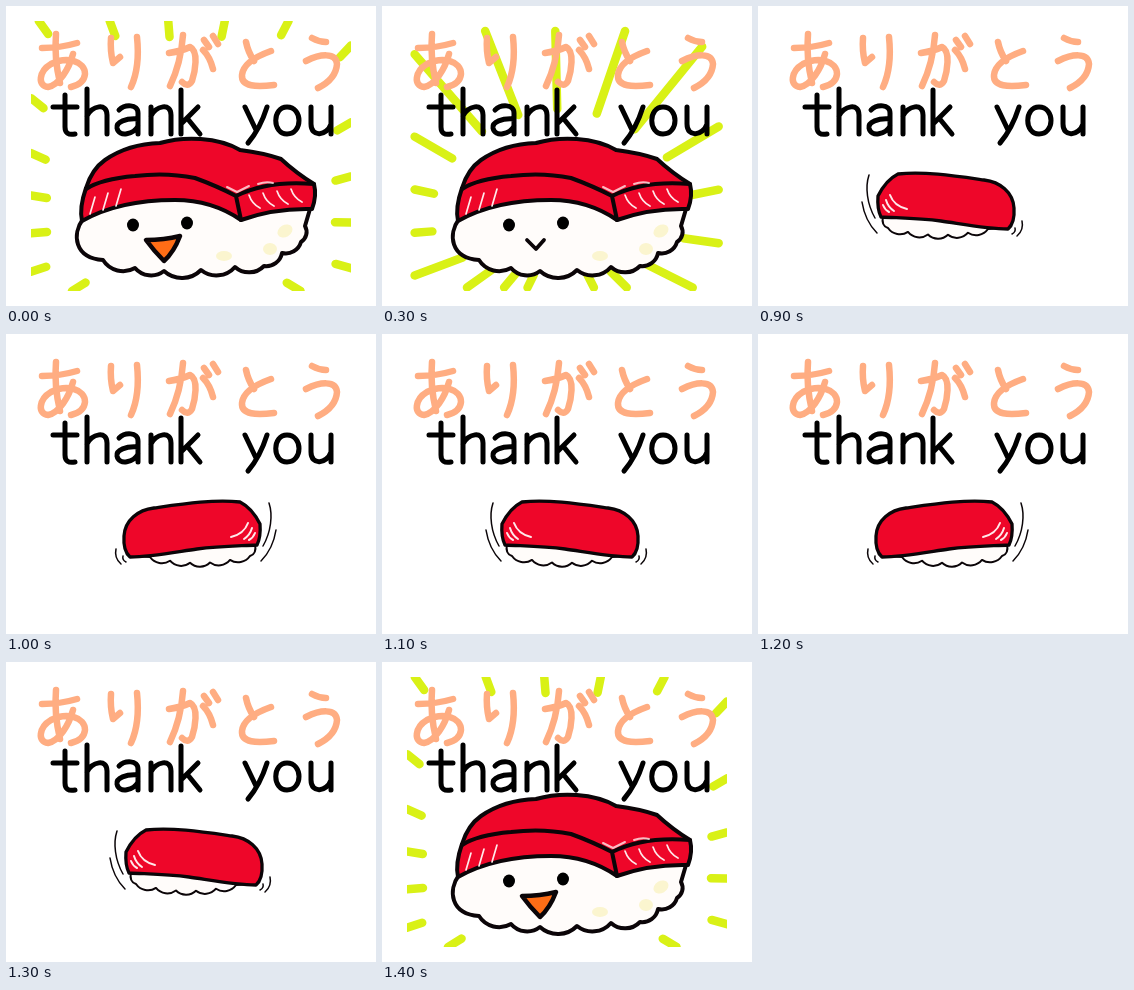
An HTML page that plays this animation: 370 by 300 pixels, repeating every 1500 ms.

```html
<!DOCTYPE html>
<html lang="ja">
<head>
<meta charset="utf-8">
<title>Thank you sushi</title>
<style>
  html, body { margin: 0; width: 100%; height: 100%; overflow: hidden; background: #fff; }
  svg { display: block; width: 370px; height: 300px; }
  path { stroke-linecap: round; stroke-linejoin: round; }
  .line, .shine, .rays, .word { fill: none; }
  .line, .ink { stroke: #0b0508; }
  .red { fill: #ee0629; }
  .rice { fill: #fffcfa; }
  .shine { stroke: #ffe9ea; }
  .rays { stroke: #d9f116; stroke-width: 8.5; }
</style>
</head>
<body>
<svg viewBox="0 0 370 300" role="img" aria-label="ありがとう thank you">
  <defs><clipPath id="frame"><path d="M25 15H345V285H25Z"/></clipPath></defs>
  <g clip-path="url(#frame)">
    <path class="rays" id="shortRays"/>
    <path class="rays" id="longRays"/>
    <g class="word" id="kana" stroke="#ffad82" stroke-width="6.5"/>
    <g class="word" id="latin" stroke="#000" stroke-width="5"/>

    <g id="big">
      <path class="ink rice" id="bigRice" stroke-width="4"/>
      <g fill="#fbf5cf">
        <ellipse cx="218" cy="250" rx="8" ry="5"/>
        <ellipse cx="264" cy="243" rx="7" ry="6"/>
        <ellipse cx="279" cy="225" rx="8" ry="6" transform="rotate(-30 279 225)"/>
      </g>
      <path class="ink red" stroke-width="4" d="M76 215Q73 202 80 182Q86 163 99 154Q122 138 154 137C178 130 212 131 234 144Q258 147 275 153Q290 167 308 178Q311 190 306 203Q268 202 235 214Q206 194 169 194C136 194 104 199 76 215Z"/>
      <path class="line" stroke-width="4" d="M80 183Q95 173 129 170Q160 166 189 172Q211 180 230 190Q262 174 308 178M230 190L235 214"/>
      <path class="shine" stroke-width="1.7" id="grain"/>
      <path class="shine" stroke-width="2" opacity=".8" d="M221 181L231 186L243 180M252 178Q260 175 267 177"/>
      <ellipse cx="127" cy="219" rx="6" ry="6.5"/>
      <ellipse cx="181" cy="217" rx="6" ry="6.5"/>
      <path id="openMouth" class="ink" fill="#ff6d16" stroke-width="4.5" d="M140 234Q158 234 174 230Q168 246 158 255Q148 245 140 234Z"/>
      <path id="smile" class="line" stroke-width="3.8" d="M145 234L154 243L162 234"/>
    </g>

    <g id="small">
      <path class="ink rice" id="smallRice" stroke-width="2"/>
      <path class="ink red" stroke-width="3.3" d="M120 190Q128 174 140 168C166 165 198 170 226 174C242 176 255 186 256 202Q257 217 250 223C229 223 204 218 183 215C160 212 139 212 123 211Q119 203 120 190Z"/>
      <path class="shine" stroke-width="2" d="M132 189Q136 200 149 203M128 194Q130 201 136 205M125 199Q127 204 131 206"/>
      <path class="line" stroke-width="1.5" d="M111 169C107 181 109 198 117 212M104 196Q107 215 119 227M264 215Q266 224 259 230M257 222Q258 226 254 228"/>
    </g>
  </g>
</svg>
<script>
  const byId = id => document.getElementById(id);
  const setPath = (id, d) => byId(id).setAttribute("d", d);
  const range = n => [...Array(n).keys()];

  // Hand lettering: each glyph is drawn from the left edge of its cell.
  const kana = {
    "あ": "M4 42Q22 42 39 37M18 28Q16 52 22 77M35 48C31 63 21 79 10 81C-1 80 1 65 13 58C29 50 47 55 47 68Q46 78 33 81",
    "り": "M8 32Q7 45 10 57L17 51M34 31C36 50 34 68 28 81",
    "が": "M1 47Q14 45 22 41C31 45 27 66 24 75Q20 82 14 76M15 29Q13 57 2 80M35 44Q42 51 45 63M36 34L41 41M45 30L50 38",
    "と": "M13 36Q15 46 21 55M38 45C24 50 10 58 9 69C8 81 24 81 41 79",
    "う": "M14 32Q21 36 28 36M8 55C22 48 38 46 39 58Q38 73 20 82"
  };
  const arch = "M5 110C10 100 25 96 25 109V128";
  const latin = {
    t: "M3 101H27M15 89V121Q15 130 25 128",
    h: "M5 83V128" + arch,
    a: "M5 104C11 98 24 98 24 107V128M24 113C12 112 2 116 3 122C5 132 20 128 24 120",
    n: "M5 101V128" + arch,
    k: "M3 84V128M20 101L4 117M9 112L22 128",
    y: "M3 101L14 124M25 101Q18 123 6 137",
    o: "M13 101C-2 101 -2 128 13 128C29 128 29 101 13 101Z",
    u: "M5 101V118C5 132 21 130 25 118M25 101V128"
  };
  function write(id, word, glyphs, left, advance) {
    byId(id).innerHTML = [...word].map((letter, i) =>
      `<path d="${glyphs[letter] ?? ""}" transform="translate(${left + advance * i})"/>`).join("");
  }
  write("kana", "ありがとう", kana, 32, 65);
  write("latin", "thank you", latin, 44, 32);

  // Rays fan out from the sushi, a little denser on its left side.
  const center = { x: 178, y: 215 };
  const boxRadius = (cos, sin) =>
    Math.min((cos < 0 ? 153 : 167) / Math.abs(cos), (sin < 0 ? 200 : 70) / Math.abs(sin));
  const ovalRadius = (cos, sin) => 1 / Math.hypot(cos / 130, sin / (sin < 0 ? 112 : 55));

  function fan(count, from, to, skew, reach) {
    return range(count).map(i => {
      const p = i / (count - 1), turn = Math.PI * p;
      const degrees = from + (to - from) * p - skew * Math.sin(turn) * (1 + Math.cos(turn));
      const cos = Math.cos(degrees * Math.PI / 180), sin = Math.sin(degrees * Math.PI / 180);
      const [inner, outer] = reach(cos, sin);
      const point = r => `${center.x + r * cos} ${center.y + r * sin}`;
      return `M${point(inner)}L${point(outer)}`;
    }).join("");
  }
  setPath("shortRays", fan(17, 148, 391, 4, (cos, sin) => {
    const edge = boxRadius(cos, sin);
    return [edge - 16, edge];
  }));
  setPath("longRays", fan(18, 116, 423, 11, (cos, sin) =>
    [ovalRadius(cos, sin), Math.min(225, 0.95 * boxRadius(cos, sin))]));

  // Round bumps of rice between neighbouring points.
  const scallops = points => points.slice(1).map(([x, y], i) => {
    const r = 0.72 * Math.hypot(x - points[i][0], y - points[i][1]);
    return `A${r} ${r} 0 0 0 ${x} ${y}`;
  }).join("");
  setPath("bigRice", "M90 190L77 213C66 228 68 252 97 254" +
    scallops([[97, 254], [129, 262], [158, 265], [195, 264], [229, 261], [258, 260], [276, 247], [295, 236], [299, 220]]) +
    "L304 203L290 190Z");
  setPath("smallRice", "M130 205L125 210Q123 220 130 222" +
    scallops(range(6).map(i => [130 + 20 * i, 222 + 7 * Math.sin(i * 0.6)])) +
    "L244 222L240 210Z");

  setPath("grain",
    range(3).map(i => `M${84 + 13 * i} ${208 - 4 * i}l5 -17`).join("") +
    range(4).map(i => `M${243 + 14 * i} ${189 - 2 * i}q3 9 11 13`).join(""));

  const LOOP = 1500;
  const show = (id, on) => byId(id).setAttribute("display", on ? "inline" : "none");

  function draw(time) {
    const smile = time >= 300 && time < 900;
    const wobble = time >= 900 && time < 1400;
    const open = !smile && !wobble;
    const flipped = Math.floor(time / 100) % 2 === 0;
    show("shortRays", open);
    show("openMouth", open);
    show("longRays", smile);
    show("smile", smile);
    show("big", !wobble);
    show("small", wobble);
    byId("small").setAttribute("transform", flipped ? "matrix(-1 0 0 1 374 0)" : "");
  }

  const begin = performance.now();
  function tick() {
    draw((performance.now() - begin) % LOOP);
    requestAnimationFrame(tick);
  }
  tick();
</script>
</body>
</html>
```
